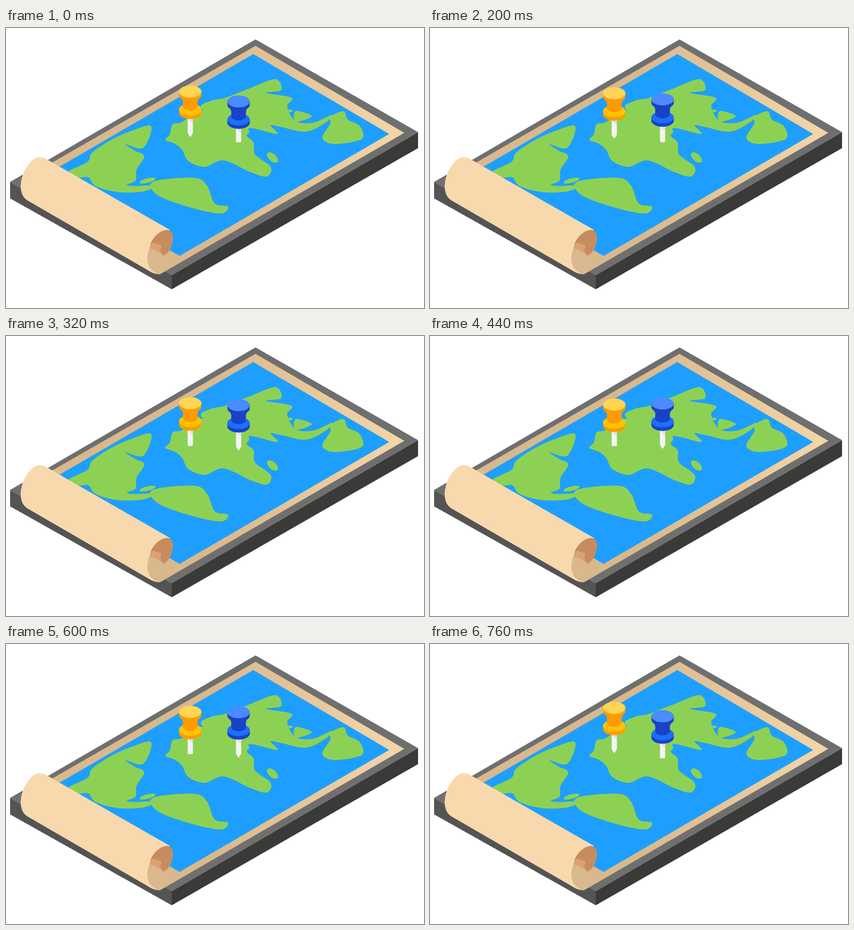
Write an HTML page that moves like this. It is 913 px wide and 613 px high and loops after 800 ms.

```html
<!DOCTYPE html>
<html lang="en">
<head>
<meta charset="utf-8">
<title>Map with pins</title>
<style>
html, body { margin: 0; width: 100%; height: 100%; overflow: hidden; background: #fff; }
svg { display: block; }
</style>
</head>
<body>
<svg id="stage" width="913" height="613" viewBox="0 0 913 613">
  <defs>
    <linearGradient id="paper" gradientUnits="userSpaceOnUse" x1="450" y1="0" x2="850" y2="0">
      <stop stop-color="#d8b88c"/><stop offset="1" stop-color="#f3d5a8"/>
    </linearGradient>
  </defs>

  <!-- board -->
  <path fill="#545454" d="M9 337L362 541V572L9 373Z"/>
  <path fill="#3a3a39" d="M900 228V263L362 572V541Z"/>
  <path fill="#6f6f6f" d="M545 25L900 228L362 541L9 337Z"/>

  <!-- sheet -->
  <path fill="url(#paper)" d="M545 39L870 229.5L335 540L60 318Z"/>
  <path fill="#1e9fff" d="M540 57L837 232L379 499L82 324Z"/>
  <g id="land" fill="#8dd154">
    <ellipse cx="582" cy="283.5" rx="14.5" ry="8" transform="rotate(42 582 283.5)"/>
    <ellipse cx="620.5" cy="181.5" rx="5" ry="3"/>
    <ellipse cx="309" cy="334" rx="18" ry="5" transform="rotate(-14 309 334)"/>
  </g>

  <!-- rolled end -->
  <path fill="#d8b88c" d="M309 505L313 482H345L379 499L372 518L335 539C318 540 309 525 309 505Z"/>
  <path fill="#f8d9ae" d="M358 442L90 288C78 281 66 281 56 291C42 304 33 325 32 345C32 360 37 371 46 377L318 535Q324 538 332 538C318 534 309 522 309 505C309 495 311 488 314 482L340 460Z"/>
  <path fill="#c68c5e" d="M315 474C322 456 338 442 352 442C362 443 365 451 365 460C364 476 355 495 344 498C338 490 330 480 315 474Z"/>
  <path fill="#dda273" d="M317 470C327 471 336 474 340 478C335 485 338 493 344 498C334 495 333 486 313 483Z"/>
</svg>

<script>
const LOOP = 800, STEP = 40;

// A few coastline points per land mass; the curve fills in the rest.
const COASTS = [
  // North America
  `317,215 272,226 228,246 188,273 178,293 136,315 158,327 180,327 196,346 243,359 299,358
   326,345 282,346 264,343 283,334 285,311 302,281 282,269 262,255 300,262`,
  // South America
  '315,346 335,333 412,328 439,345 456,384 485,391 470,406 414,396 340,371',
  // Europe and Africa
  `384,206 364,211 358,233 348,245 368,253 385,267 398,291 434,304 476,290 535,316 570,325
   578,304 544,277 541,251 526,236 530,222 500,180 427,181`,
  // Asia
  `500,228 534,219 592,232 578,213 602,217 655,227 697,208 712,190 672,207 633,204 614,172
   624,153 568,142 601,136 588,112 530,133 478,153 446,160 428,178`,
  // Oceania
  '737,182 709,194 708,210 691,241 718,254 777,243 772,214 747,201',
  // Borneo
  '633,182 668,193 633,205'
];

const PINS = [
  { x: 402.5, y: 126, floor: 241, travel: 11.5, turn: 520, fall: 280,
    top: '#ffd553', side: '#ff9b00', base: '#ffc400' },
  { x: 508, y: 147.5, floor: 250, travel: -13.5, turn: 508, fall: 350,
    top: '#4a8cff', side: '#1a42c6', base: '#1a70ff' }
];

// Closed Catmull-Rom curve through "x,y" pairs.
function smoothPath(text) {
  const points = text.trim().split(/\s+/).map(pair => pair.split(',').map(Number));
  const at = i => points[(i + points.length) % points.length];
  const handle = (i, sign) => at(i).map((v, k) => v + sign * (at(i + 1)[k] - at(i - 1)[k]) / 6);
  return `M${at(0)}` + points.map((_, i) =>
    `C${handle(i, 1)} ${handle(i + 1, -1)} ${at(i + 1)}`).join('') + 'Z';
}

const disc = (y, top, side) => `
  <path fill="${side}" d="M-24.5 ${y}v7.5a24.5 13.2 0 0 0 49 0v-7.5Z"/>
  <ellipse cy="${y}" rx="24.5" ry="13.2" fill="${top}"/>`;

const pinMarkup = ({ floor, top, side, base }, i) => `
  <clipPath id="floor${i}"><rect width="913" height="${floor}"/></clipPath>
  <g clip-path="url(#floor${i})"><g class="pin${i}">
    <path fill="#f4f4f4" d="M-5.7 60H5.7V104L0 113L-5.7 104Z"/>
    <path fill="#dedede" d="M-5.7 70H5.7V84Q2 77 -5.7 73Z"/>
  </g></g>
  <g class="pin${i}">
    ${disc(52.5, base, side)}
    <path fill="${side}" d="M-21 26Q-15 32 -16 40V46A16 9 0 0 0 16 46V40Q15 32 21 26Z"/>
    ${disc(13.2, top, side)}
  </g>`;

const ease = u => (1 - Math.cos(Math.PI * u)) / 2;

function draw() {
  const t = Math.floor(performance.now() % LOOP / STEP) * STEP;
  PINS.forEach(({ x, y, travel, turn, fall }, i) => {
    const progress = t < turn ? ease(t / turn) : 1 - ease((t - turn) / fall);
    document.querySelectorAll(`.pin${i}`).forEach(part =>
      part.setAttribute('transform', `translate(${x} ${y + travel * progress})`));
  });
  requestAnimationFrame(draw);
}

document.getElementById('land').insertAdjacentHTML('beforeend',
  COASTS.map(coast => `<path d="${smoothPath(coast)}"/>`).join(''));
document.getElementById('stage').insertAdjacentHTML('beforeend', PINS.map(pinMarkup).join(''));
draw();
</script>
</body>
</html>
```
